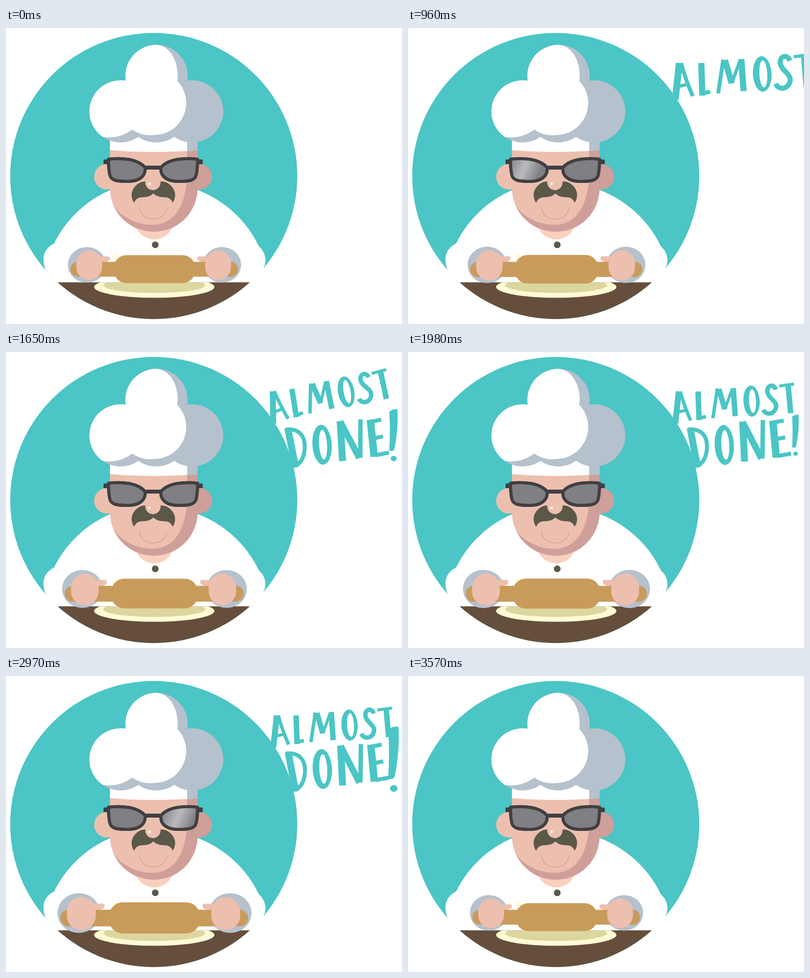
Write an HTML page that moves like this. It is 800 by 600 pixels and loops after 3600 ms.

```html
<!DOCTYPE html>
<html lang="en">
<head>
<meta charset="utf-8">
<title>Chef rolling dough</title>
<style>
html, body { margin: 0; width: 100%; height: 100%; overflow: hidden; background: #fff; }
svg { display: block; width: 100vw; height: 100vh; }
.teal { fill: #4bc5c5; }
.skin { fill: #ecbfaf; }
.shade { fill: #cf9f99; }
.grey { fill: #b5c1cd; }
.white { fill: #fff; }
.wood { fill: #c99b5b; }
.olive { fill: #5a5848; }
.cream { fill: #fffbd4; }
.brush { fill: none; stroke: #4bc5c5; stroke-linejoin: round; }
</style>
</head>
<body>
<svg viewBox="0 0 800 600" role="img" aria-label="A chef rolls out dough: Almost done!">
  <defs>
    <clipPath id="tableClip"><rect y="515.5" width="800" height="85"/></clipPath>
    <linearGradient id="glint" gradientUnits="userSpaceOnUse" x1="-34" y1="0" x2="34" y2="0">
      <stop offset="0" stop-color="#fff" stop-opacity="0"/>
      <stop offset=".45" stop-color="#fff" stop-opacity=".4"/>
      <stop offset=".55" stop-color="#fff" stop-opacity=".45"/>
      <stop offset="1" stop-color="#fff" stop-opacity="0"/>
    </linearGradient>
    <path id="lens" d="M207 266C230 263 266 264 281 283C283 301 268 311 246 311C224 311 213 309 210 299C208 291 207 278 207 266Z"/>
    <g id="hand" class="skin">
      <rect x="142" y="451" width="52" height="60" rx="26"/>
      <path d="M180 463H206Q210 463 210 467Q209 474 200 474H180Z"/>
    </g>
  </defs>

  <circle class="teal" cx="298.5" cy="300" r="290"/>

  <!-- lettering -->
  <g id="almost"></g>
  <g id="done"></g>
  <g id="bang" class="teal">
    <path d="M776 131Q782 126 789 127.500Q791 158 784 192Q780 196 776 193Q778 160 776 131Z"/>
    <ellipse cx="783" cy="206" rx="4.800" ry="4.300"/>
  </g>

  <!-- body -->
  <path class="white" d="M97 437A227 227 0 0 1 212 328H386A227 227 0 0 1 511 443C521 451 525 464 524 474C523 485 517 493 512 497L493 516H104L85 497C79 490 77 484 76 474C74 460 80 445 97 437Z"/>
  <circle class="olive" cx="301.5" cy="439.5" r="6.8"/>
  <circle cx="299.5" cy="389" r="39.5" fill="#f9d0be"/>

  <!-- head -->
  <circle class="skin" cx="204" cy="301.5" r="26"/>
  <circle class="shade" cx="390.5" cy="301.5" r="26"/>
  <path class="skin" d="M210 240V325A88.5 88.5 0 0 0 387 325V240Z"/>
  <path class="shade" d="M366 240H387V325A88.5 88.5 0 0 1 218 361C234 384 264 399 298 399C345 397 366 352 366 290Z"/>

  <!-- hat -->
  <path class="white" d="M210 200V247.5Q298 255 387 247.5V200Z"/>
  <path class="grey" d="M366 200V250Q378 249 387 247.5V200Z"/>
  <g class="grey">
    <circle cx="231.5" cy="169" r="63"/>
    <circle cx="303.5" cy="169" r="63"/>
    <circle cx="376" cy="169" r="63"/>
    <circle cx="304" cy="97" r="63"/>
  </g>
  <path class="white" d="M195 220.5A63 63 0 0 1 168.5 169A63 63 0 0 1 242 107A63 63 0 0 1 303 34C333 36 347 68 347 97L346 107A65 65 0 0 1 298 217A65 65 0 0 1 255 206Q228 226 195 220.5Z"/>

  <!-- face -->
  <g class="olive">
    <path id="tash" d="M298 330L283 311C266 310 252 327 254 341C255 348 257 352 259 354C262 346 268 343 277 343C288 343 294 339 298 335Z"/>
    <use href="#tash" transform="translate(595.5) scale(-1 1)"/>
  </g>
  <circle class="skin" cx="296.8" cy="313" r="15.5"/>
  <circle cx="290" cy="315.8" r="2.8" fill="#fff3d6"/>
  <path d="M269.5 362C270 395 322 396 325 364" fill="none" stroke="#cf9f99" stroke-width="1.3"/>

  <g fill="#807f84" stroke="#403f41" stroke-width="6" stroke-linejoin="round">
    <use href="#lens"/>
    <use href="#lens" transform="translate(594) scale(-1 1)"/>
  </g>
  <g fill="#403f41">
    <rect x="279" y="279" width="36" height="8"/>
    <rect x="197" y="266.5" width="10" height="9.5" rx="1.5"/>
    <rect x="387" y="266.5" width="10.5" height="9.5" rx="1.5"/>
  </g>
  <g id="shine" fill="url(#glint)"></g>

  <!-- table and dough -->
  <g clip-path="url(#tableClip)">
    <circle cx="298.5" cy="300" r="290" fill="#654e3c"/>
    <ellipse class="cream" cx="299.5" cy="525" rx="121.5" ry="21.8"/>
    <ellipse cx="299.5" cy="521.5" rx="103" ry="15.5" fill="#dcd69f"/>
  </g>
  <circle class="cream" cx="222" cy="463.5" r="5"/>

  <!-- rolling pin -->
  <g id="pin">
    <ellipse class="grey" cx="163.5" cy="480" rx="38.5" ry="36"/>
    <ellipse class="grey" cx="436.5" cy="480" rx="38.5" ry="36"/>
    <rect class="wood" x="130" y="474" width="339" height="30" rx="15"/>
    <rect class="wood" x="218" y="460.5" width="164" height="56.5" rx="25"/>
    <use href="#hand"/>
    <use href="#hand" transform="translate(596.5) scale(-1 1)"/>
  </g>
</svg>
<script>
const LOOP = 3600, STEP = 30;
const $ = id => document.getElementById(id);

// Each stroke: brush width, then its path.
const words = {
  almost: [
    [12, 'M547 80L540 145'], [7, 'M550 80Q559 112 571 139'], [6, 'M545 122L565 117'],
    [11, 'M586 80L588 138'], [7, 'M588 134L602 131'],
    [7, 'M625 74L616 134'], [11, 'M628 75L640 116'], [6, 'M640 116L655 75'], [11, 'M657 73L661 130'],
    [9, 'M743 76C738 63 725 68 726 80C727 94 748 100 743 114C739 127 723 129 718 117'],
    [6, 'M750 69L780 65'], [11, 'M768 67L773 124']
  ],
  done: [
    [14, 'M570 154L585 234'], [8, 'M566 157C594 154 605 172 604 194C603 213 597 225 584 231'],
    [14, 'M676 141L680 222'], [13, 'M676 142L714 216'], [9, 'M717 138L716 216'],
    [15, 'M737 139L744 214'], [8, 'M738 143L759 139'], [8, 'M742 177L762 173'], [8, 'M746 211L774 206']
  ]
};
// Round letters: centre, outer radii, radii of the off-centre counter.
const rounds = {
  almost: [694, 99.5, 16.5, 31.5, 7, 24],
  done: [639, 188.5, 19.5, 40.5, 8, 30]
};

const ring = (x, y, rx, ry) =>
  `M${x - rx} ${y}a${rx} ${ry} 0 1 0 ${2 * rx} 0a${rx} ${ry} 0 1 0 ${-2 * rx} 0Z`;

for (const id in words) {
  const [x, y, rx, ry, hx, hy] = rounds[id];
  $(id).innerHTML =
    words[id].map(([w, d]) => `<path class="brush" stroke-width="${w}" d="${d}"/>`).join('') +
    `<path class="teal" fill-rule="evenodd" transform="rotate(-3 ${x} ${y})" d="${ring(x, y, rx, ry)}${ring(x + 2, y, hx, hy)}"/>`;
}

// The shine stays inside the rims: both lenses, inset by half the rim.
const lensPath = $('lens').getAttribute('d');
const mirrored = lensPath.replace(/(\d+) (\d+)/g, (m, x, y) => `${594 - x} ${y}`);
$('shine').innerHTML = `<path d="${lensPath}${mirrored}"/>` +
  `<path d="${lensPath}${mirrored}" fill="none" stroke="#403f41" stroke-width="6" stroke-linejoin="round"/>`;

// Smooth interpolation through [time, value] pairs.
function track(t, keys) {
  if (t <= keys[0][0]) return keys[0][1];
  for (let i = 1; i < keys.length; i++) {
    const [t0, a] = keys[i - 1], [t1, b] = keys[i];
    if (t <= t1) {
      const u = (t - t0) / (t1 - t0);
      return a + (b - a) * u * u * (3 - 2 * u);
    }
  }
  return keys[keys.length - 1][1];
}

function pose(id, x, y, scale, turn = 0) {
  const el = $(id);
  el.style.display = scale > 0.001 ? '' : 'none';
  el.setAttribute('transform',
    `translate(${x} ${y}) rotate(${turn}) scale(${scale}) translate(${-x} ${-y})`);
}

function draw(t) {
  const phase = t % 900 / 450;
  const grow = t >= LOOP - STEP ? 0 : 1 - Math.abs(1 - phase);
  pose('pin', 300, 475.5, 1 + 0.2 * grow);

  // The shine crosses right to left, then returns.
  const sweep = Math.min(t, 3486 - t);
  const x = 360 - (sweep - 450) * 0.255;
  $('glint').setAttribute('gradientTransform', `translate(${x} 290) rotate(24)`);

  pose('almost', 540, 145,
    track(t, [[690, 0], [960, 1.14], [1110, 1], [3150, 1], [3315, 1.14], [3480, 0]]),
    track(t, [[1290, 0], [1410, -5.3], [1530, -13], [1620, -8], [1770, 0]]));
  pose('done', 580, 232,
    track(t, [[1080, 0], [1290, 1.04], [1410, 0.98], [1530, 1], [3000, 1], [3120, 1.04], [3270, 0]]),
    track(t, [[1290, 0], [1410, -2.4], [1500, -3], [1710, 0]]));
  pose('bang', 782.5, 169,
    track(t, [[1320, 0], [1410, 0.7], [1545, 1.6], [1740, 1], [2760, 1], [2970, 1.59], [3120, 0]]));
}

function tick() {
  draw(Math.floor(performance.now() % LOOP / STEP) * STEP);
  requestAnimationFrame(tick);
}
tick();
</script>
</body>
</html>
```
